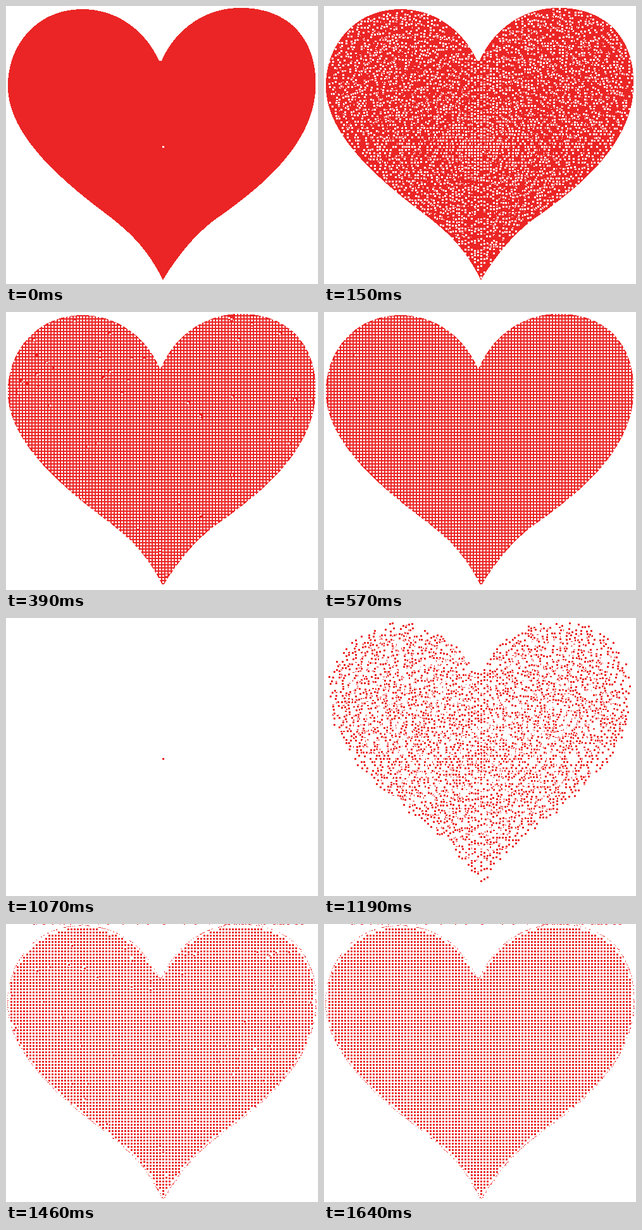
An HTML page with a canvas that plays this animation: 493 px wide and 441 px high, repeating every 2140 ms.

```html
<!DOCTYPE html>
<html lang="en">
<head>
<meta charset="utf-8">
<title>Heart of dots</title>
<style>
html, body { margin: 0; width: 100%; height: 100%; overflow: hidden; background: #fff; }
canvas { display: block; width: 493px; height: 441px; }
</style>
</head>
<body>
<canvas id="stage" width="493" height="441"></canvas>
<script>
const W = 493, H = 441, CX = 248, CY = 223;
const RED = '#eb2525', WHITE = '#fff';
const LOOP = 2140, HALF = 1070, STEP = 30, LAST = 19;
const PITCH = 5;
const ctx = document.getElementById('stage').getContext('2d');

const outline = new Path2D(`M242 87 C222 42 178 5 121 5 C50 5 3 60 3 128
  C3 205 90 277 148 322 C196 358 222 383 248 434.5
  C272 395 298 364 326 342 C400 290 489.5 220 489.5 123
  C489.5 55 450 3 370 3 C310 3 265 42 246 87 Z`);

function seeded(seed) {
  return () => {
    seed = (seed + 0x6D2B79F5) | 0;
    let t = Math.imul(seed ^ (seed >>> 15), 1 | seed);
    t = (t + Math.imul(t ^ (t >>> 7), 61 | t)) ^ t;
    return ((t ^ (t >>> 14)) >>> 0) / 4294967296;
  };
}

// Hard-edged heart, used both as picture and as hit test
const heart = document.createElement('canvas');
heart.width = W;
heart.height = H;
const hctx = heart.getContext('2d', { willReadFrequently: true });
hctx.fillStyle = RED;
hctx.fill(outline);
const mask = hctx.getImageData(0, 0, W, H);
for (let i = 0; i < mask.data.length; i += 4) {
  const solid = mask.data[i + 3] > 127;
  mask.data.set(solid ? [235, 37, 37, 255] : [0, 0, 0, 0], i);
}
hctx.putImageData(mask, 0, 0);

const inside = (x, y) =>
  x >= 0 && y >= 0 && x < W && y < H && mask.data[(y * W + x) * 4 + 3] > 0;
const whole = (x, y) =>
  [-1, 1].every(a => [-1, 1].every(b => inside(x + a, y + b)));

// Every step a dot covers a random share of the way that is left
function makePath(rand) {
  const path = [0];
  for (let left = 1; path.length <= LAST;) {
    left *= 1 - 0.96 * rand();
    path.push(1 - left);
  }
  return path;
}

function makeDots(fits, seed) {
  const rand = seeded(seed), dots = [];
  for (let dy = -45 * PITCH; dy <= 45 * PITCH; dy += PITCH) {
    for (let dx = -50 * PITCH; dx <= 50 * PITCH; dx += PITCH) {
      if (!fits(CX + dx, CY + dy)) continue;
      dots.push({ dx, dy, path: makePath(rand), order: rand() });
    }
  }
  return dots.sort((a, b) => a.order - b.order);
}

// Loose crumbs around the rim and along the top edge
function makeCrumbs() {
  const rand = seeded(77), crumbs = [];
  for (let y = 0; y < H; y++) {
    for (let x = 0; x < W; x++) {
      const rim = inside(x, y) && !(inside(x - 1, y) && inside(x + 1, y) &&
        inside(x, y - 1) && inside(x, y + 1));
      if (!rim || rand() > 0.35) continue;
      crumbs.push({
        x: Math.round(CX + (x - CX) * 1.004),
        y: Math.round(CY + (y - CY) * 1.014),
        w: rand() < 0.3 ? 2 : 1,
        from: 5 + Math.floor(rand() * 5)
      });
    }
  }
  for (let x = 43; x < 484; x += 4 + Math.floor(30 * rand() ** 2)) {
    crumbs.push({ x, y: 0, w: 1 + Math.floor(rand() * 4), from: 7 });
  }
  return crumbs;
}

const whiteDots = makeDots(inside, 11);
const redDots = makeDots(whole, 23);
const crumbs = makeCrumbs();

function stamp(dot, step, reach, color) {
  const go = dot.path[step], size = 2 * reach + 1;
  ctx.fillStyle = color;
  ctx.fillRect(CX + Math.round(dot.dx * go) - reach,
    CY + Math.round(dot.dy * go) - reach, size, size);
}

// Each dot wipes its last place and a rim around its new one
function scatter(dots, step, color, ground) {
  ctx.fillStyle = ground;
  ctx.fillRect(0, 0, W, H);
  for (const dot of dots) {
    if (step > 0) stamp(dot, step - 1, 2, ground);
    stamp(dot, step, 2, ground);
    stamp(dot, step, 1, color);
  }
}

function draw(second, step) {
  if (!second) {
    scatter(whiteDots, step, WHITE, RED);
    ctx.globalCompositeOperation = 'destination-in';
    ctx.drawImage(heart, 0, 0);
    ctx.globalCompositeOperation = 'source-over';
    return;
  }
  scatter(redDots, step, RED, WHITE);
  ctx.fillStyle = RED;
  for (const c of crumbs) {
    if (step >= c.from) ctx.fillRect(c.x, c.y, c.w, 1);
  }
}

let shown = '';
function tick() {
  const t = performance.now() % LOOP;
  const second = t >= HALF;
  const step = Math.min(LAST, Math.floor((t % HALF) / STEP));
  const key = second + ':' + step;
  if (key !== shown) {
    draw(second, step);
    shown = key;
  }
  requestAnimationFrame(tick);
}
tick();
</script>
</body>
</html>
```
